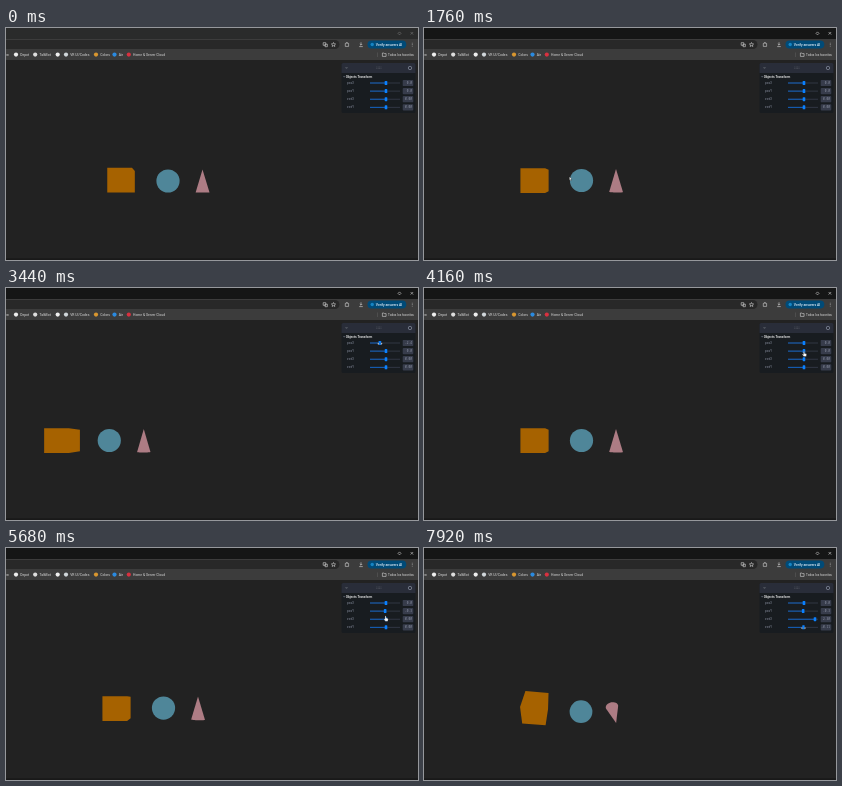
An HTML page that plays this animation: 412x232 px, repeating every 8 s.

```html
<!DOCTYPE html>
<html lang="es">
<head>
<meta charset="utf-8">
<title>Group transform</title>
<style>
  html, body { margin: 0; width: 100%; height: 100%; overflow: hidden; background: #222; }
  svg { display: block; width: 100vw; height: 100vh; }
  text { font-family: Roboto, "Open Sans", sans-serif; font-size: 3.4px; fill: #dedede; }
  .mono { font-family: "Noto Sans Mono", "DejaVu Sans Mono", monospace; font-size: 2.9px; fill: #9299aa; }
  .line { fill: none; stroke: #d4d4d4; stroke-width: .6; }
</style>
</head>
<body>
<svg viewBox="0 0 412 232" preserveAspectRatio="none">
  <rect width="412" height="232" fill="#222"/>
  <path id="cube" fill="#a66200"/>
  <circle id="ball" fill="#4f8699"/>
  <path id="cone" fill="#ad7c84"/>
  <rect y="230.3" width="412" height="1.7" fill="#191919"/>

  <rect id="titleBar" width="412" height="11"/>
  <rect y="11" width="412" height="21" fill="#3c3c3c"/>
  <rect x="-10" y="12" width="343.5" height="9" rx="4.5" fill="#282828"/>
  <g id="windowIcons" class="line">
    <path d="M393.5 3.9l1.5 1.5-1.5 1.5-1.5-1.5z"/>
    <path d="M404.6 4l2.6 2.6m0-2.6l-2.6 2.6"/>
  </g>
  <g class="line">
    <path d="M317.2 14.7h2.6v2.6h-2.6zM319 16.2h2.4v2.5h-2.4z"/>
    <path d="M327.5 14.5l.6 1.4 1.5.1-1.1 1 .3 1.5-1.3-.8-1.3.8.3-1.5-1.1-1 1.5-.1z"/>
    <path d="M339.3 15.4h1.1v-.9h1v.9h1.2v3h-3.3z"/>
    <path d="M355 14.3v2.8m-1.2-1.1l1.2 1.2 1.2-1.2M353.2 18.6h3.6"/>
    <path d="M406.3 14.8v.7m0 .8v.7m0 .8v.7"/>
    <path d="M376.4 25h1.5l.5.6h1.7v2.8h-3.7z"/>
  </g>
  <rect x="361.5" y="12.4" width="38.8" height="8.2" rx="4.1" fill="#004a77"/>
  <circle cx="366.2" cy="16.5" r="1.7" fill="#1685c4"/>
  <text x="369.8" y="17.7" style="fill:#e4f0fa;font-weight:500">Verify answers AI</text>
  <g id="bookmarks"></g>
  <path d="M371.5 24.5v4.5" stroke="#606060" stroke-width=".5"/>
  <text x="382" y="27.8" style="font-size:3.05px">Todos los favoritos</text>

  <rect x="335.5" y="35" width="74" height="50" rx="1.6" fill="#181c20"/>
  <path d="M335.5 45V36.6a1.6 1.6 0 0 1 1.6-1.6h70.8a1.6 1.6 0 0 1 1.6 1.6V45z" fill="#292d39"/>
  <path d="M338.8 39.2h3.4l-1.7 1.7z" fill="#535760"/>
  <path d="M370.4 39h5m-5 1.5h5" stroke="#535760" stroke-width=".7" stroke-dasharray=".8 .6"/>
  <circle cx="404" cy="40" r="1.7" fill="none" stroke="#8c92a4" stroke-width=".7"/>
  <path d="M337.3 48.3h1.6l-.8 1.1z" fill="#8c92a4"/>
  <text x="339.8" y="50" style="fill:#fefefe;font-weight:500;font-size:3.2px">Objects Transform</text>
  <g id="rows"></g>

  <g id="cursor" fill="#fff" stroke="#111" stroke-width=".3">
    <path id="arrow" d="M-.6-1.3l2.4 2.4-1 .1.6 1.4-.6.3-.6-1.4-.8.7z"/>
    <path id="hand" d="M-.6 0q.6-.8 1.1 0v1.7l1.7.5q.5.3.4.9l-.4 1.9h-2.4l-1.6-2 .4-.5.8.5z"/>
    <path id="resize" d="M-2.7 0l1.7-1.2v2.4zM2.7 0l-1.7-1.2v2.4z"/>
  </g>
</svg>
<script>
const LOOP = 8000, ZERO = 380;
const UNIT = 23, DEPTH = 7.2 * UNIT, EYE_X = 148;
const MOVE = 0.386, TURN = 0.209; // value per slider pixel
const CURSORS = ['arrow', 'hand', 'resize'];

const $ = id => document.getElementById(id);
const set = (el, attrs) => { for (const k in attrs) el.setAttribute(k, attrs[k]); return el; };
function add(parent, tag, attrs, text = '') {
  const el = set(document.createElementNS('http://www.w3.org/2000/svg', tag), attrs);
  el.textContent = text;
  return parent.appendChild(el);
}
const clamp = (v, lo, hi) => Math.min(hi, Math.max(lo, v));
const mix = (a, b, u) => a + (b - a) * u;
// Eased step from 0 to 1 between times a and b
function ramp(t, a, b) {
  const u = clamp((t - a) / (b - a), 0, 1);
  return u * u * (3 - 2 * u);
}

const rowY = i => 55 + i * 8.1;

[[-4, 'none', 'w'], [10, '#eee', 'Depot'], [29.2, '#ddd', 'TalkBot'], [51.7, '#eee', ''],
 [60, '#d0d6da', 'VR UI/Codes'], [90, '#d9962f', 'Colors'], [108.5, '#2a8ae0', 'Air'],
 [122.8, '#d8303f', 'Home & Server Cloud']
].forEach(([x, fill, label]) => {
  add($('bookmarks'), 'circle', { cx: x, cy: 26.6, r: 2.1, fill });
  add($('bookmarks'), 'text', { x: x + 4.2, y: 27.8 }, label);
});

const rows = ['posX', 'posY', 'rotX', 'rotY'].map((label, i) => {
  const y = rowY(i), g = $('rows');
  add(g, 'text', { x: 341, y: y + 1, class: 'mono' }, label);
  add(g, 'rect', { x: 364, y: y - .4, width: 30, height: .8, fill: '#373c4b' });
  const fill = add(g, 'rect', { x: 364, y: y - .4, height: .8, fill: '#0a6ce0' });
  const thumb = add(g, 'rect', { y: y - 2, width: 2.6, height: 4, rx: .6, fill: '#0a80ff' });
  add(g, 'rect', { x: 396.7, y: y - 3.1, width: 10.6, height: 6.2, rx: .9, fill: '#373c4b' });
  const value = add(g, 'text', { x: 406, y: y + 1.1, class: 'mono', 'text-anchor': 'end' });
  return { fill, thumb, value };
});

// Horizontal mouse travel on each slider
const drags = [
  { from: 2090, to: 3960, shift: t => 6.2 * Math.sin(2 * Math.PI * clamp((t - 2090) / 1870, 0, 1)) },
  { from: 4240, to: 5500, shift: t => 7.4 * ramp(t, 4240, 4700) - 8.25 * ramp(t, 4700, 5450) },
  { from: 5850, to: 7400, shift: t => 35 * ramp(t, 6700, 7350) - 22 * ramp(t, 5850, 6600) },
  { from: 7820, to: LOOP, shift: t => -.55 * ramp(t, 7820, 7920) }
];

const cubePoints = [];
for (const x of [-.5, .5]) for (const y of [-.5, .5]) for (const z of [-.5, .5]) cubePoints.push([x, y, z]);
const conePoints = [[3.5, .5, 0]];
for (let i = 0; i < 32; i++) {
  const a = i / 16 * Math.PI;
  conePoints.push([3.5 + .29 * Math.cos(a), -.5, .29 * Math.sin(a)]);
}

// Convex outline of projected points
function outline(points) {
  points.sort((a, b) => a[0] - b[0] || a[1] - b[1]);
  const half = list => {
    const out = [];
    for (const p of list) {
      while (out.length > 1) {
        const [a, b] = out.slice(-2);
        if ((b[0] - a[0]) * (p[1] - a[1]) - (b[1] - a[1]) * (p[0] - a[0]) > 0) break;
        out.pop();
      }
      out.push(p);
    }
    return out.slice(0, -1);
  };
  const ring = half(points).concat(half(points.slice().reverse()));
  return 'M' + ring.map(p => p[0].toFixed(2) + ' ' + p[1].toFixed(2)).join('L') + 'Z';
}

function drawObjects(t, [px, py, rx, ry]) {
  const tilt = ramp(t, 450, 1080), back = ramp(t, 1150, 1450); // camera drag
  const eyeY = 164 - 12 * tilt;
  const ox = 162 - 2 * tilt - 2.5 * back + (px - 2) * UNIT - EYE_X;
  const oy = 153 - 11.5 * tilt + 11 * back - py * UNIT - eyeY;
  const [sx, cx, sy, cy] = [Math.sin(rx), Math.cos(rx), Math.sin(ry), Math.cos(ry)];
  const project = ([x, y, z]) => {
    const x1 = x * cy + z * sy, z1 = z * cy - x * sy;
    const y2 = y * cx - z1 * sx, z2 = y * sx + z1 * cx;
    const s = DEPTH / (DEPTH - z2 * UNIT);
    return [EYE_X + (ox + x1 * UNIT) * s, eyeY + (oy - y2 * UNIT) * s, s];
  };
  set($('cube'), { d: outline(cubePoints.map(project)) });
  set($('cone'), { d: outline(conePoints.map(project)) });
  const [bx, by, s] = project([2, 0, 0]);
  set($('ball'), { cx: bx, cy: by, r: .505 * UNIT * s });
}

function drawCursor(t) {
  let x = 425, y = -8;
  const go = (from, to, tx, ty) => {
    const u = ramp(t, from, to);
    x = mix(x, tx, u);
    y = mix(y, ty, u);
  };
  go(0, 200, 394, 4);
  go(220, 700, 150, 206);
  go(700, 1080, 146, 150);
  drags.forEach((d, i) => go(d.from - 300, d.from - 50, ZERO + d.shift(t), rowY(i) + .8));
  const active = drags.some(d => t >= d.from && t < d.to);
  const shape = active ? 'resize' : x > 335 ? 'hand' : 'arrow';
  CURSORS.forEach(id => set($(id), { visibility: id === shape ? 'visible' : 'hidden' }));
  set($('cursor'), { transform: `translate(${x} ${y})` });
}

function draw(t) {
  const values = drags.map((d, i) => {
    const x = clamp(ZERO + d.shift(t), 365, 391), v = (x - ZERO) * (i < 2 ? MOVE : TURN);
    set(rows[i].fill, { width: x - 364 });
    set(rows[i].thumb, { x: x - 1.3 });
    rows[i].value.textContent = v.toFixed(i < 2 ? 1 : 2);
    return v;
  });
  drawObjects(t, values);
  drawCursor(t);
  const focused = t >= 80;
  set($('titleBar'), { fill: focused ? '#151616' : '#2a2b2b' });
  set($('windowIcons'), { opacity: focused ? 1 : .45 });
}

const start = performance.now();
function tick() {
  draw((performance.now() - start) % LOOP);
  requestAnimationFrame(tick);
}
tick();
</script>
</body>
</html>
```
